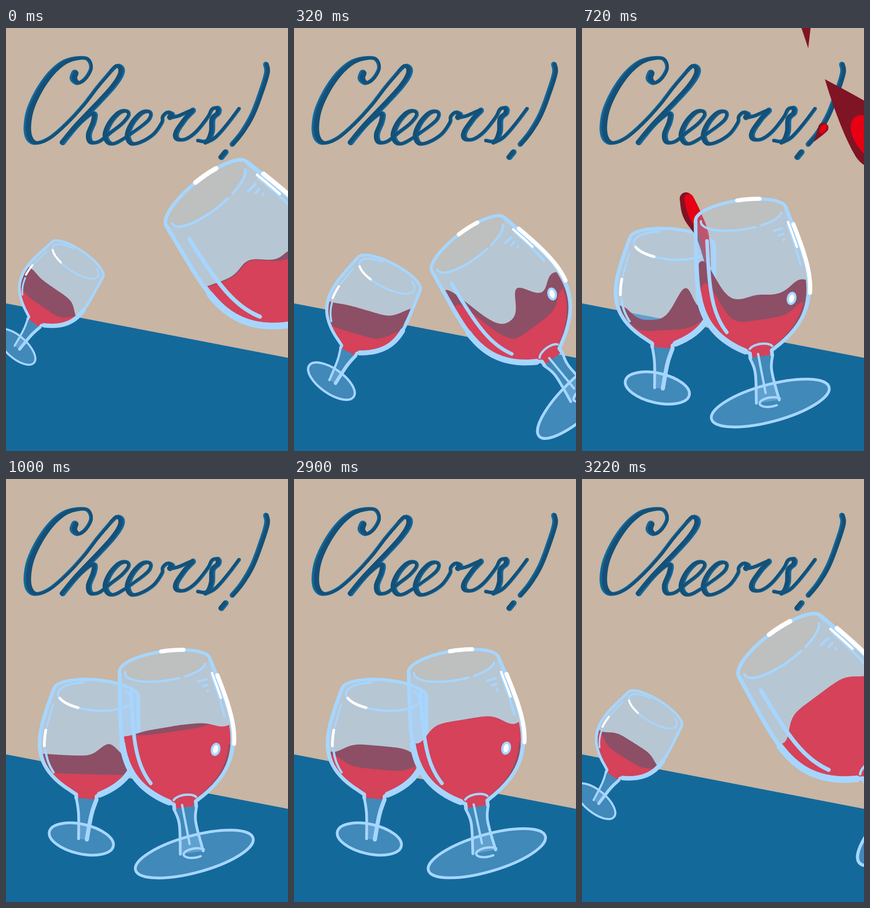
An HTML page with a canvas for the animation above (3.26 s loop, 611 by 917 pixels).

```html
<!DOCTYPE html>
<html lang="en">
<head>
<meta charset="utf-8">
<title>Cheers!</title>
<style>
html, body { margin: 0; width: 100%; height: 100%; overflow: hidden; background: #c8b5a3; }
canvas { display: block; }
</style>
</head>
<body>
<canvas id="stage" width="611" height="917" role="img" aria-label="Cheers!"></canvas>
<script>
const ctx = document.getElementById('stage').getContext('2d');
const LOOP = 3260, STEP = 40, RAD = Math.PI / 180;
const LINE = '#a6d6ff', WHITE = '#fff', TINT = 'rgba(166,212,255,.3)';
const RED = '#e60012', MAROON = '#7f1424', WINE = '#d5425a', PLUM = '#8c4f66';
const BLUE = '#14699b', NAVY = '#155078';

const range = (n, f) => Array.from({ length: n + 1 }, (_, i) => f(i / n));
const mix = (a, b, f) => Array.isArray(a) ? a.map((v, i) => mix(v, b[i], f)) : a + (b - a) * f;
const bell = (x, width) => Math.exp(-((x / width) ** 2));

// keys: [time, value, easing exponent on the way in]
function tween(keys, t) {
  const i = Math.max(0, keys.findLastIndex(k => k[0] <= t));
  const [t0, a] = keys[i], next = keys[i + 1];
  if (!next || t <= t0) return a;
  const [t1, b, ease = 1] = next;
  return mix(a, b, ((t - t0) / (t1 - t0)) ** ease);
}
// Catmull-Rom curve through a few points
function smooth(p) {
  const get = j => p[Math.max(0, Math.min(p.length - 1, j))];
  return range((p.length - 1) * 16, q => {
    const u = q * (p.length - 1), k = Math.min(Math.floor(u), p.length - 2), f = u - k;
    const [a, b, c, d] = [get(k - 1), get(k), get(k + 1), get(k + 2)];
    return b.map((v, j) => v + f / 2 * (c[j] - a[j]
      + f * (2 * a[j] - 5 * v + 4 * c[j] - d[j] + f * (3 * (v - c[j]) + d[j] - a[j]))));
  });
}
function poly(points) {
  const path = new Path2D();
  points.forEach(([x, y]) => path.lineTo(x, y));
  return path;
}
function oval(x, y, rx, ry, deg = 0, from = 0, to = 360) {
  const path = new Path2D();
  path.ellipse(x, y, rx, ry, deg * RAD, from * RAD, to * RAD);
  return path;
}
function fill(path, color, rule = 'nonzero') {
  ctx.fillStyle = color;
  ctx.fill(path, rule);
}
function stroke(path, width = 5, color = LINE) {
  ctx.lineWidth = width;
  ctx.strokeStyle = color;
  ctx.stroke(path);
}
// Brush mark through [x, y, width] points; shift moves it sideways by a share of its width
function ribbon(points, scale = 1, shift = 0) {
  const path = new Path2D();
  for (const [x, y, w] of points) {
    const cx = x + shift * w, r = w / 2 * scale;
    path.moveTo(cx + r, y);
    path.arc(cx, y, r, 0, 7);
  }
  return path;
}

// Lettering: a broad pen that presses harder on the way down
const pts = s => s.split(' ').map(p => p.split(',').map(Number));
const letterE = pts('228,226 252,207 266,189 261,180 245,184 226,205 216,231 224,249 245,246');
const penStrokes = [
  [pts('149,98 146,110 157,119 173,108 184,86 176,67 152,66 125,75 97,99 71,136 52,178 46,216 51,240 67,249 95,238 130,208 167,168 198,128 228,93 240,82'), 8, .16],
  [pts('228,93 240,82 250,88 248,103 232,127 205,157 180,183 150,215 123,248'), 6, -.16],
  [[...pts('124,246 156,211 181,189 192,187 190,204 180,230 184,247 202,246'), ...letterE,
    ...letterE.slice(1).map(([x, y]) => [x + 48, y + 1]),
    ...pts('320,230 338,205 340,192 350,183 360,188 356,194 375,190 405,178 388,198 370,225 371,240 389,241 412,225 437,194 447,176 459,174 460,184 448,197 446,225 436,245 416,244')], 5, -.14],
  [pts('432,249 454,237 480,208 505,175'), 0, -.12],
  [pts('563,79 565,97 553,137 534,187 512,225 490,252'), 4, .18],
  [pts('476,269 467,280'), 6, -.18]
];
const ink = penStrokes.flatMap(([p, press, shift]) => {
  const line = smooth(p);
  const marked = line.map(([x, y], i) => {
    const [ax, ay] = line[Math.max(0, i - 8)], [bx, by] = line[Math.min(line.length - 1, i + 8)];
    const down = Math.max(0, (by - ay) / Math.hypot(bx - ax, by - ay));
    return [x, y, 8 + press * down];
  });
  return [[ribbon(marked), BLUE], [ribbon(marked, .74, shift), NAVY]];
});

// A glass stands on its own axis: origin at the rim centre, y towards the foot.
// poses: [time, [x, y, scale, degrees]]
// wine: [time, [back level, front level, tilt, swell x, swell, right swell, hump x, hump]]
const left = {
  rim: 92, height: 230, belly: .45, lean: -6, heavy: 1,
  stem: [[22, 230], [14, 264], [9, 318]], foot: [-3, 318, 71, 32, 7.6],
  poses: [
    [0, [155, 502, .727, 34.5]], [320, [206, 533, .83, 27.7], 1.4], [520, [191, 487, .96, 12.2]],
    [560, [195, 464, 1, 5.2]], [2900, [195, 464, 1, 5.2]], [3220, [155, 502, .727, 34.5], 1.15]
  ],
  wine: [
    [0, [110, 175, 0, -100, 10, -35, 0, 0]], [320, [110, 178, -.2, -100, -5, 40, 0, 0]],
    [520, [125, 180, -.2, -100, 18, 30, 0, 0]], [720, [168, 192, -.15, -100, 35, 25, 38, 65]],
    [1320, [115, 166, 0, -100, -22, -20, 38, 0], .7]
  ]
};
const right = {
  rim: 99, height: 311, belly: .58, lean: 5, heavy: -1,
  stem: [[25, 311], [18, 345], [25, 410]], foot: [5, 414, 132, 40, -7],
  poses: [
    [0, [435, 360, 1.125, -38.4]], [320, [378, 470, .988, -36.6], 1.4], [520, [329, 411, 1, -12.2]],
    [560, [344, 404, 1, -8.2]], [2860, [344, 404, 1, -8.2]], [2900, [348, 403, 1, -10.4]],
    [3220, [435, 360, 1.125, -38.4], 1.1]
  ],
  wine: [
    [0, [178, 180, .35, -15, 22, 0, 60, 14]], [320, [190, 230, 0, -100, 140, 30, 28, 50]],
    [520, [250, 252, 0, -52, 105, 30, 32, 50]], [720, [183, 232, 0, -98, 95, 25, 10, 5]],
    [1120, [120, 120, 0, -105, -35, -27, 10, 0], .7]
  ]
};

// Part of the bowl's side from depth v0 to v1, drawn in towards the axis by k
function side(g, dir, k, v0, v1) {
  return range(32, q => {
    const v = v0 + (v1 - v0) * q;
    const r = Math.max(.24, (1 + g.belly * v) * (1 - v ** 4) ** .9);
    return [dir * k * g.rim * r + g.lean * Math.sin(Math.PI * v), v * g.height];
  });
}
const wall = (...args) => poly(side(...args));

for (const g of [left, right]) {
  const R = g.rim, lid = range(24, q => [-R * Math.cos(Math.PI * q), -.31 * R * Math.sin(Math.PI * q)]);
  const outline = k => poly([...lid, ...side(g, 1, k, 0, 1), ...side(g, -1, k, 1, 0)]);
  const stemRight = smooth(g.stem), stemLeft = stemRight.map(([x, y]) => [-x, y]);
  g.bowl = outline(1);
  g.inner = outline(.95);
  g.front = new Path2D(g.bowl);
  if (g === right) g.front.addPath(oval(0, 0, .96 * R, .33 * R));
  g.stemFill = poly([...stemLeft, ...stemRight.reverse()]);
  g.footPath = oval(...g.foot);
  g.lines = [
    [g.footPath, 6], [poly(lid), 7], [wall(g, -1, 1, 0, 1), 8], [wall(g, 1, 1, 0, 1), 8],
    [wall(g, g.heavy, 1, .5, .95), 13], [poly(stemLeft), 6], [poly(stemRight), g === left ? 9 : 6]
  ];
}
left.lines.push(
  [oval(-2, 8, 80, 30, 0, -35, 250), 5],
  [wall(left, -1, .89, .14, .36), 4], [wall(left, -1, .88, .58, .78)],
  [oval(-2, 8, 80, 30, 0, 115, 160), 6, WHITE], [wall(left, -1, .9, .39, .54), 6, WHITE]
);
right.lines.push(
  [oval(0, 5, 88, 28, 0, 72, 185)], [oval(0, 5, 88, 28, 0, 8, 63)],
  [wall(right, -1, .77, .15, .8), 8], [wall(right, 1, .9, .12, .41)],
  [oval(2, 296, 26, 12, 0, 200, 340)], [poly([[-6, 305], [-2, 391]])], [oval(6, 412, 24, 10, 0, 60, 330)],
  ...[0, 1, 2].map(i => [poly([[66 + 9 * i, 45 + 12 * i], [85, 43 + 12 * i]])]),
  [oval(0, 0, 99, 31, 0, 268, 297), 9, WHITE],
  [wall(right, 1, .93, .1, .28), 5, WHITE], [wall(right, 1, 1.02, .12, .61), 9, WHITE]
);

// Wine surface: a level line with swells; the far edge may carry one more hump
function pourWine(g, t) {
  const [back, front, tilt, sx, swell, rightSwell, hx, hump] = tween(g.wine, t);
  const far = [], near = [];
  for (let x = -150; x <= 150; x += 3) {
    const a = swell * bell(x - sx, 32), b = rightSwell * bell(x - 1.1 * g.rim, 32);
    const y = back + tilt * x - a - b - hump * bell(x - hx, 26);
    far.push([x, y]);
    near.push([x, Math.max(y, front + tilt * x - Math.abs(a) - Math.abs(b))]);
  }
  const floor = [[150, g.height], [-150, g.height]];
  ctx.save();
  ctx.clip(g.inner);
  fill(poly([...far, ...floor]), PLUM);
  fill(poly([...near, ...floor]), WINE);
  if (g === right) stroke(wall(g, 1, .95, .62, 1), 8, PLUM);
  ctx.restore();
}

// The tongue of wine that leaps over the rim and falls back
const calm = [[268, 610, 8], [262, 590, 10], [268, 580, 12], [275, 575, 12]];
const tongue = [
  [400, calm],
  [520, [[268, 610, 14], [264, 520, 22], [282, 450, 34], [305, 392, 38]]],
  [720, [[274, 515, 10], [263, 450, 24], [241, 404, 34], [229, 370, 26]]],
  [880, calm]
];
function drawTongue(t, dark, bright) {
  if (t < 400 || t >= 880) return;
  const points = smooth(tween(tongue, t));
  fill(ribbon(points, 1.05, -.14), dark);
  fill(ribbon(points, .8, .1), bright);
}

// Flying drops: place and speed at time `at`, pulled down by `g`, tail trailing behind
const drops = [
  { at: 520, x: 384, y: 247, vx: 1.3, vy: -1.5, g: .0075, r: 20, grow: .2, tail: 3, from: 440, to: 840 },
  { at: 720, x: 523, y: 216, vx: .8, vy: -1.2, g: .002, r: 11, grow: .02, tail: 3.3, from: 600, to: 1000 },
  { at: 720, x: 483, y: -20, vx: -.2, vy: -1.8, g: .002, r: 14, grow: .02, tail: 4.6, from: 600, to: 800 }
];
function drawDrop(d, t) {
  if (t < d.from || t >= d.to) return;
  const dt = t - d.at, r = Math.max(3, d.r + d.grow * dt);
  ctx.save();
  ctx.translate(d.x + d.vx * dt, d.y + d.vy * dt + d.g * dt * dt);
  ctx.rotate(Math.atan2(d.vy + 2 * d.g * dt, d.vx));
  const body = oval(0, 0, r, r, 0, -100, 100);
  body.quadraticCurveTo(-r * 1.2, r * .8, -r * d.tail, 0);
  body.quadraticCurveTo(-r * 1.2, -r * .7, -r * .17, -r);
  fill(body, MAROON);
  fill(oval(-r * .2, r * .1, r * 1.05, r * .6), RED);
  ctx.restore();
}

function drawGlass(g, t) {
  const [x, y, scale, deg] = tween(g.poses, t);
  ctx.save();
  ctx.translate(x, y);
  ctx.rotate(deg * RAD);
  ctx.scale(scale, scale);
  fill(g.footPath, TINT);
  fill(g.stemFill, TINT);
  fill(g.bowl, TINT);
  fill(g.front, TINT, 'evenodd');
  if (g === right) {
    ctx.save();
    ctx.clip(g.bowl);
    ctx.resetTransform();
    ctx.globalAlpha = Math.min(1, Math.max(.4, 1 - (t - 520) / 330));
    drawTongue(t, PLUM, WINE);
    ctx.globalAlpha = 1;
    if (t >= 440 && t < 620) {
      const slide = (t - 520) * .25;
      fill(oval(438, 472 + slide, 12, 32, -5), PLUM);
      fill(oval(435, 457 + slide, 10, 17, -8), WINE);
    }
    ctx.restore();
  }
  pourWine(g, t);
  for (const line of g.lines) stroke(...line);
  if (g === right) {
    const glint = oval(83, 196, 8, 12, 22);
    fill(glint, WHITE);
    stroke(glint);
  }
  ctx.restore();
}

const table = poly([[0, 597], [611, 715], [611, 917], [0, 917]]);
function draw(t) {
  ctx.lineCap = ctx.lineJoin = 'round';
  ctx.fillStyle = '#c8b5a3';
  ctx.fillRect(0, 0, 611, 917);
  fill(table, BLUE);
  for (const [path, color] of ink) fill(path, color);
  drawGlass(left, t);
  if (t >= 440) drawTongue(t, MAROON, RED);
  drawGlass(right, t);
  for (const d of drops) drawDrop(d, t);
  if (t >= 520 && t < 560) {
    stroke(poly([[178, 423], [203, 445]]), 6, WHITE);
    fill(oval(267, 369, 4, 7), WHITE);
    fill(oval(199, 516, 7, 4), WHITE);
    fill(oval(210, 573, 5, 9, 25), WHITE);
  }
}

// A small lead keeps each step from showing late
const LEAD = 14, start = performance.now();
function tick() {
  const t = (performance.now() - start + LEAD) % LOOP;
  draw(Math.floor(t / STEP) * STEP);
  requestAnimationFrame(tick);
}
tick();
</script>
</body>
</html>
```
